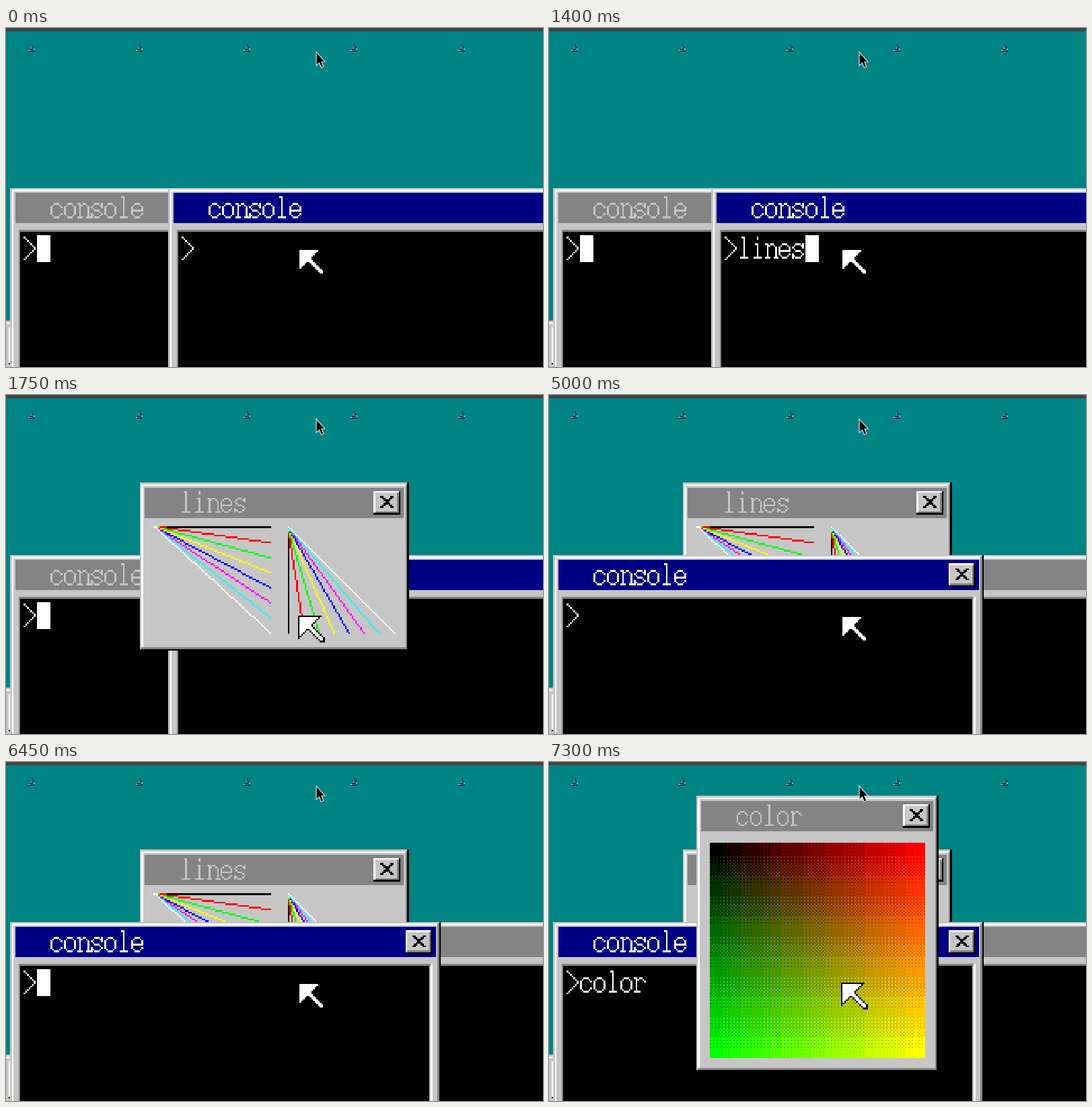
Write an HTML page with a canvas that moves like this. It is 798 by 504 pixels and loops after 8 s.

```html
<!DOCTYPE html>
<html lang="en">
<head>
<meta charset="utf-8">
<title>Console demo</title>
<style>
  html, body { margin: 0; width: 100%; height: 100%; overflow: hidden; background: #444; }
  canvas { display: block; }
</style>
</head>
<body>
<canvas id="stage" width="798" height="504"></canvas>
<script>
const LOOP = 8000;
const W = 320, H = 200;
const BLACK = '#000', WHITE = '#fff', GREY = '#c6c6c6', DARK = '#848484';
const NAVY = '#000084', TEAL = '#008484';
const PALETTE = [BLACK, '#f00', '#0f0', '#ff0', '#00f', '#f0f', '#0ff', WHITE];

// Glyphs as polylines on an 8x16 grid; each point is two hex digits, x and y.
const GLYPHS = {
  '>': ['01 67', '68 0e'],
  c: ['67 45 25 07 0b 2d 4d 6b'],
  o: ['25 45 67 6b 4d 2d 0b 07 25'],
  e: ['09 69 67 45 25 07 0b 2d 4d 6b'],
  l: ['21 31 3d', '1d 5d'],
  i: ['31 32', '25 35 3d', '1d 5d'],
  n: ['05 15 1d', '26 35 45 67 6d', '0d 2d', '5d 7d'],
  r: ['05 15 1d', '26 35 45 67', '0d 3d'],
  s: ['65 67 45 25 07 18 29 49 6b 4d 2d 0b 0d']
};

const stage = document.getElementById('stage').getContext('2d');

function makeLayer(w, h) {
  const canvas = document.createElement('canvas');
  canvas.width = w;
  canvas.height = h;
  return canvas.getContext('2d');
}

const screen = makeLayer(W, H);

// Inclusive corners.
function box(g, color, x0, y0, x1, y1) {
  g.fillStyle = color;
  g.fillRect(x0, y0, x1 - x0 + 1, y1 - y0 + 1);
}

function line(g, color, x0, y0, x1, y1) {
  const len = Math.max(Math.abs(x1 - x0), Math.abs(y1 - y0)) + 1;
  const step = (a, b) => Math.trunc((b - a + (a <= b ? 1 : -1)) * 1024 / len);
  const dx = step(x0, x1), dy = step(y0, y1);
  g.fillStyle = color;
  for (let i = 0; i < len; i++) {
    g.fillRect(x0 + (i * dx >> 10), y0 + (i * dy >> 10), 1, 1);
  }
}

function text(g, color, x, y, str) {
  [...str].forEach((ch, n) => {
    for (const path of GLYPHS[ch]) {
      const pts = path.split(' ').map(p => [x + n * 8 + parseInt(p[0], 16), y + parseInt(p[1], 16)]);
      for (let i = 1; i < pts.length; i++) line(g, color, ...pts[i - 1], ...pts[i]);
    }
  });
}

function closeButton(g, x, y) {
  box(g, BLACK, x, y, x + 15, y + 13);
  box(g, WHITE, x, y, x + 14, y + 12);
  box(g, DARK, x + 1, y + 1, x + 14, y + 12);
  box(g, GREY, x + 1, y + 1, x + 13, y + 11);
  for (let i = 0; i < 7; i++) {
    box(g, BLACK, x + 4 + i, y + 3 + i, x + 5 + i, y + 3 + i);
    box(g, BLACK, x + 10 - i, y + 3 + i, x + 11 - i, y + 3 + i);
  }
}

function makeWindow(w, h, title, active) {
  const g = makeLayer(w, h);
  box(g, BLACK, 0, 0, w - 1, h - 1);
  box(g, GREY, 0, 0, w - 2, h - 2);
  box(g, DARK, 1, 1, w - 2, h - 2);
  box(g, WHITE, 1, 1, w - 3, h - 3);
  box(g, GREY, 2, 2, w - 3, h - 3);
  box(g, active ? NAVY : DARK, 3, 3, w - 4, 20);
  text(g, active ? WHITE : GREY, 24, 4, title);
  closeButton(g, w - 21, 5);
  return g;
}

function makeConsole(active) {
  const g = makeWindow(256, 165, 'console', active);
  box(g, WHITE, 5, 25, 250, 158);
  box(g, DARK, 5, 25, 249, 157);
  box(g, GREY, 6, 26, 249, 157);
  box(g, BLACK, 6, 26, 248, 156);
  return g;
}

function makeLines() {
  const g = makeWindow(160, 100, 'lines', false);
  PALETTE.forEach((color, i) => {
    line(g, color, 8, 26, 77, i * 9 + 26);
    line(g, color, 88, 26, i * 9 + 88, 89);
  });
  return g;
}

// Red runs across and green runs down, ordered-dithered to six levels each.
function makeColor() {
  const g = makeWindow(144, 164, 'color', false);
  const order = [3, 1, 0, 2];
  for (let y = 0; y < 128; y++) {
    for (let x = 0; x < 128; x++) {
      const shift = order[(x & 1) + (y & 1) * 2];
      const level = v => (((v * 2 * 21 >> 8) + shift) >> 2) * 51;
      g.fillStyle = `rgb(${level(x)},${level(y)},0)`;
      g.fillRect(x + 8, y + 28, 1, 1);
    }
  }
  return g;
}

function makePointer() {
  const g = makeLayer(16, 16);
  for (let y = 0; y < 16; y++) {
    for (let x = 0; x < 16; x++) {
      const off = Math.abs(x - y), tail = y >= 6;
      const inside = (x > 0 && y > 0 && x + y <= 12) || (tail && off <= 1 && x < 15 && y < 15);
      const edge = x + y <= 13 || (tail && off <= 2);
      if (inside || edge) box(g, inside ? WHITE : BLACK, x, y, x, y);
    }
  }
  return g;
}

const consoles = { on: makeConsole(true), off: makeConsole(false) };
const linesEmpty = makeWindow(160, 100, 'lines', false);
const linesWin = makeLines();
const colorWin = makeColor();
const pointer = makePointer();

const put = (layer, x, y) => screen.drawImage(layer.canvas, x, y);

function drawConsole(x, active, typed, cursor) {
  const y = 93;
  put(active ? consoles.on : consoles.off, x, y);
  text(screen, WHITE, x + 8, y + 28, '>' + typed);
  if (cursor) {
    const cx = x + 16 + typed.length * 8;
    box(screen, WHITE, cx, y + 28, cx + 7, y + 43);
  }
}

function drawDesktop() {
  box(screen, TEAL, 0, 0, W - 1, H - 1);
  box(screen, GREY, 0, H - 28, W - 1, H - 1);
  box(screen, WHITE, 0, H - 27, W - 1, H - 27);
  box(screen, WHITE, 3, H - 24, 59, H - 24);
  box(screen, WHITE, 2, H - 24, 2, H - 4);
  box(screen, BLACK, 2, H - 3, 59, H - 3);
}

const typedBy = (word, times, t) => word.slice(0, times.filter(k => t >= k).length);
const within = (t, a, b) => t >= a && t < b;

function drawScreen(t) {
  drawDesktop();
  const right = () => drawConsole(97, t < 5000,
    typedBy('lines', [650, 800, 900, 1100, 1150], t),
    within(t, 400, 900) || within(t, 1400, 1700));
  const left = () => drawConsole(3, t >= 5000,
    typedBy('color', [6550, 6600, 6800, 7050, 7100], t),
    t < 5000 || within(t, 5400, 5950) || within(t, 6450, 6950));

  if (t < 5000) {
    left();
    right();
    if (t >= 1700) put(t < 1750 ? linesEmpty : linesWin, 80, 50);
  } else {
    right();
    put(linesWin, 80, 50);
    left();
    if (t >= 7300) put(colorWin, 88, 18);
  }
  put(pointer, 174, 129);
}

function drawSpecks() {
  for (let i = 0; i < 5; i++) {
    const x = Math.round(32 + i * 159.8);
    const dot = (color, dx, y, w) => {
      stage.fillStyle = color;
      stage.fillRect(x + dx, y, w, 1);
    };
    dot(BLACK, 5, 25, 3);
    dot(WHITE, 5, 26, 1);
    dot(BLACK, 4, 28, 2);
    dot(BLACK, 7, 28, 3);
    dot(WHITE, 4, 29, 2);
    dot(BLACK, 3, 31, 6);
    dot(WHITE, 1, 33, 2);
    dot(WHITE, 9, 31, 2);
    dot(BLACK, 1, 34, 10);
  }
}

function drawHostCursor() {
  const pts = [[461, 35.5], [461, 56], [465.5, 52], [468.3, 59], [472, 57.5], [469, 50.5], [474, 50]];
  stage.beginPath();
  pts.forEach(([x, y]) => stage.lineTo(x, y));
  stage.closePath();
  stage.fillStyle = BLACK;
  stage.fill();
  stage.strokeStyle = '#ddd';
  stage.lineWidth = 1.2;
  stage.stroke();
}

function draw(now) {
  drawScreen(now % LOOP);
  stage.fillStyle = '#444';
  stage.fillRect(0, 0, 798, 504);
  stage.imageSmoothingEnabled = false;
  stage.drawImage(screen.canvas, -1.4, 5.1, W * 2.5, H * 2.5);
  drawSpecks();
  drawHostCursor();
  requestAnimationFrame(draw);
}

const start = performance.now();
const loop = draw;
draw = now => loop(Math.max(0, now - start));
draw(start);
</script>
</body>
</html>
```
